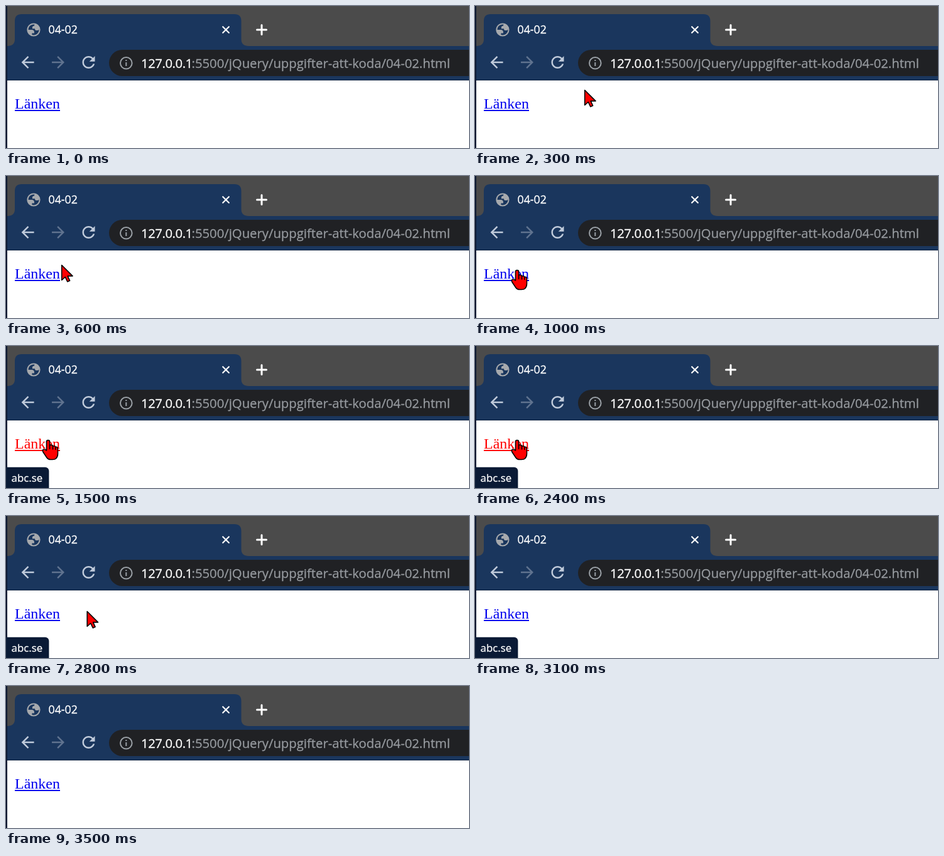
An HTML page with a canvas that plays this animation: 737x227 px, repeating every 3.6 s.

```html
<!DOCTYPE html>
<html lang="sv">
<head>
<meta charset="utf-8">
<title>04-02</title>
<style>
html, body { margin: 0; width: 100%; height: 100%; overflow: hidden; background: #fff; }
canvas { display: block; }
</style>
</head>
<body>
<canvas id="stage" width="737" height="227"></canvas>
<script>
const ctx = document.getElementById('stage').getContext('2d');
const LOOP = 3600, STEP = 100;
const NAVY = '#1a365d', EDGE = '#0a1730';
const SANS = '"Open Sans", "Noto Sans", sans-serif';

// 24-unit toolbar icons
const BACK = new Path2D('M20 11H7.83l5.59-5.59L12 4l-8 8 8 8 1.41-1.41L7.83 13H20z');
const RELOAD = new Path2D('M17.65 6.35C16.2 4.9 14.21 4 12 4c-4.42 0-8 3.58-8 8s3.58 8 8 8c3.73 0 6.84-2.55 7.73-6h-2.08c-.82 2.33-3.04 4-5.65 4-3.31 0-6-2.69-6-6s2.69-6 6-6c1.66 0 3.14.69 4.22 1.78L13 11h7V4z');
const GLOBE = new Path2D('M12 2a10 10 0 1 0 0 20a10 10 0 1 0 0-20zM4 12h4.4c3.4 0 4.9 1.7 4.5 5.1H9.5v2.5A8 8 0 0 0 20 11.5C19.3 12.5 18.3 13 17 13c-2.1 0-3.2-.9-3.2-2.75H10c-.3-2.7.7-4.1 2.9-4.1 0-1 .3-1.6.8-2A8 8 0 0 0 4 12z');
const TAB = new Path2D('M2 64Q14 64 14 53V24Q14 13 25 13H363.5Q374.5 13 374.5 24V53Q374.5 64 386.5 64Z');

// Pointers, both with the hot spot at 0,0
const ARROW = new Path2D('M.7 1.5V25.5L6.2 20.5L9.8 28L13.6 26.3L10.2 18.9H18Z');
const HAND = new Path2D('M-2.5 18V4Q-2.5 1.5 0 1.5Q2.6 1.5 2.6 4V9.5Q7 8.5 7.5 11Q11 10 11.8 12.5Q15.5 11.5 15.5 16V23Q15.5 28 12.5 31Q11 32.5 7 32.5H4Q0 32.5-2 29.5L-8 20.5Q-9.5 17.5-7.5 16.5Q-5 15.5-2.5 18Z');
const FOLDS = new Path2D('M2.6 9.5V15.5M7.5 11V16M11.8 12.5V16.5');

// [time, x, y, pointer]
const POSES = [
  [0],
  [100, 675, 72, ARROW],
  [200, 342, 121, ARROW],
  [300, 174, 133, ARROW],
  [400, 135, 137, ARROW],
  [500, 95, 141, ARROW],
  [600, 88, 141, ARROW],
  [700, 79, 146, HAND],
  [800, 72, 148, HAND],
  [900, 67, 149, HAND],
  [2800, 128.5, 151, ARROW],
  [2900, 427, 151, ARROW],
  [3000, 717, 69, ARROW],
  [3100]
];

function text(str, x, y, font, color, track = 0) {
  ctx.font = font;
  ctx.letterSpacing = track + 'px';
  ctx.fillStyle = color;
  ctx.fillText(str, x, y);
}

// Sans text with a hairline outline for a slightly firmer weight
function label(str, x, y, size, color, track) {
  text(str, x, y, size + 'px ' + SANS, color, track);
  ctx.strokeStyle = color;
  ctx.lineWidth = 0.3;
  ctx.strokeText(str, x, y);
}

function rect(x, y, w, h, color) {
  ctx.fillStyle = color;
  ctx.fillRect(x, y, w, h);
}

function icon(path, cx, cy, scale, color, flip = 1) {
  ctx.save();
  ctx.translate(cx, cy);
  ctx.scale(scale * flip, scale);
  ctx.translate(-12, -12);
  ctx.fillStyle = color;
  ctx.fill(path, 'evenodd');
  ctx.restore();
}

function line(d, width) {
  ctx.strokeStyle = '#fff';
  ctx.lineWidth = width;
  ctx.lineCap = 'round';
  ctx.stroke(new Path2D(d));
}

function drawBrowser() {
  rect(0, 0, 737, 64, '#4b4b4b');
  rect(0, 64, 737, 55, NAVY);
  ctx.fillStyle = NAVY;
  ctx.fill(TAB);

  icon(GLOBE, 44, 38, 1.06, '#a6a9ad');
  label('04-02', 67.5, 44, 17.8, '#fff');
  line('M345.2 33.2l9.6 9.6m0-9.6l-9.6 9.6', 2.2);
  line('M399.5 38h15M407 30.5v15', 3);

  icon(BACK, 34.6, 90, 1.25, '#c0cbdb');
  icon(BACK, 83, 90, 1.25, '#60738f', -1);
  icon(RELOAD, 131.5, 90, 1.25, '#c0cbdb');

  ctx.fillStyle = '#202124';
  ctx.beginPath();
  ctx.roundRect(164, 70, 620, 42, 21);
  ctx.fill();
  ctx.strokeStyle = '#9aa0a6';
  ctx.lineWidth = 2;
  ctx.beginPath();
  ctx.arc(191.3, 91.3, 9.3, 0, Math.PI * 2);
  ctx.stroke();
  rect(190.3, 86, 2, 2, '#9aa0a6');
  rect(190.3, 90, 2, 6, '#9aa0a6');

  label('127.0.0.1', 215, 99, 20.3, '#fff', -0.45);
  label(':5500/jQuery/uppgifter-att-koda/04-02.html', 295.5, 99, 20.3, '#969a9f');
  rect(0, 118, 737, 1, '#0e2140');
}

function drawPage(linkColor) {
  rect(2, 119, 735, 108, '#fff');
  rect(0, 0, 2, 227, EDGE);
  text('Länken', 14, 164, '24px "Liberation Serif", "Times New Roman", serif', linkColor);
  rect(14, 166, 72, 2, linkColor);
}

function drawStatus(alpha) {
  ctx.globalAlpha = alpha;
  ctx.fillStyle = '#0a1a35';
  ctx.beginPath();
  ctx.roundRect(0, 193.7, 68.4, 34, [0, 6, 0, 0]);
  ctx.fill();
  label('abc.se', 8.5, 217, 16.9, '#fff');
  ctx.globalAlpha = 1;
}

function drawPointer(t) {
  const [, x, y, shape] = POSES.findLast(p => p[0] <= t);
  if (!shape) return;
  ctx.save();
  ctx.translate(x, y);
  ctx.lineJoin = 'round';
  ctx.lineWidth = 1.6;
  ctx.strokeStyle = '#000';
  ctx.fillStyle = '#f00';
  ctx.fill(shape);
  ctx.stroke(shape);
  if (shape === HAND) ctx.stroke(FOLDS);
  ctx.restore();
}

// Two bursts of three quick clicks
function pressed(t) {
  return [1500, 2200].some(s => t >= s && t < s + 600 && (t - s) % 200 < 100);
}

function statusAlpha(t) {
  const show = (t - 1000) / 200, hide = (3400 - t) / 300;
  return Math.max(0, Math.min(1, show, hide));
}

function frame(now) {
  const t = Math.floor((now % LOOP) / STEP) * STEP;
  drawBrowser();
  drawPage(pressed(t) ? '#f00' : '#00e');
  drawStatus(statusAlpha(t));
  drawPointer(t);
  requestAnimationFrame(frame);
}
requestAnimationFrame(frame);
</script>
</body>
</html>
```
